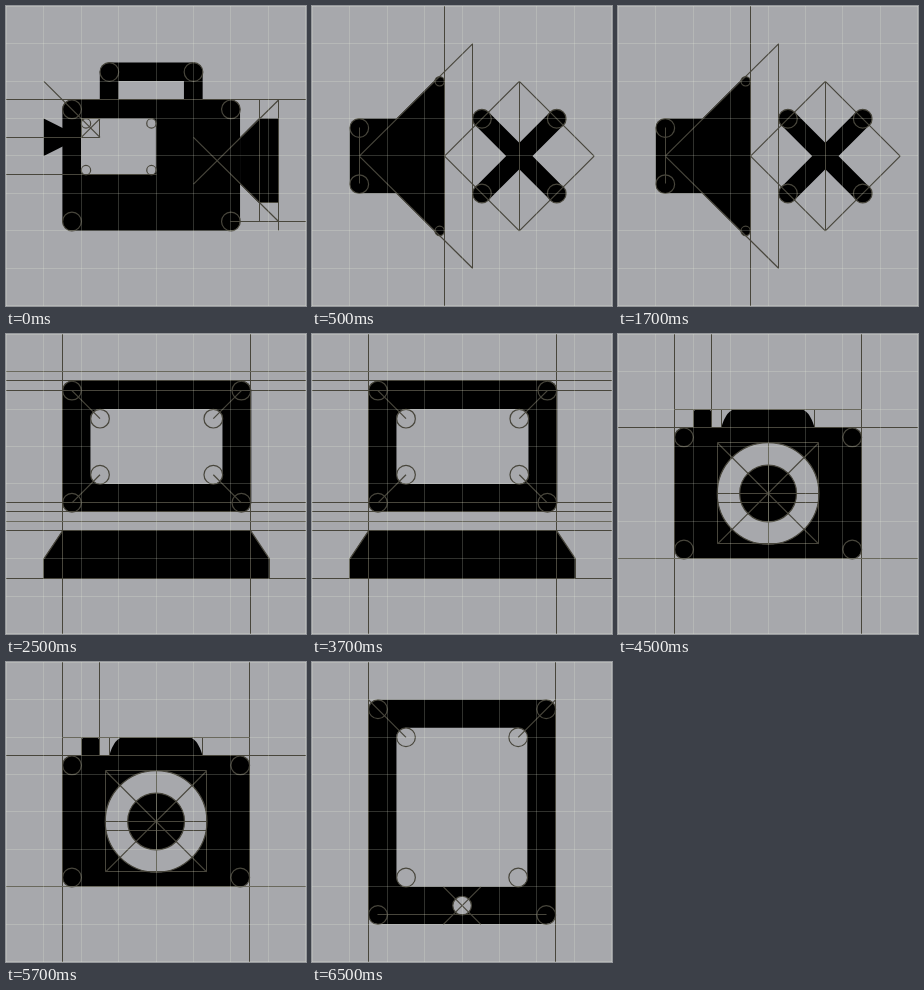
These frames come from a looping animation (300x300 px, 8000 ms). An HTML page with a canvas:

```html
<!DOCTYPE html>
<html lang="en">
<head>
<meta charset="utf-8">
<title>Icon construction</title>
<style>
html, body { margin: 0; width: 100%; height: 100%; overflow: hidden; background: #a7a8ac; }
canvas { display: block; width: 300px; height: 300px; }
</style>
</head>
<body>
<canvas id="stage" width="300" height="300"></canvas>
<script>
const ctx = document.getElementById('stage').getContext('2d');
const SIZE = 300, LOOP = 8000, HOLD = 2000, LEAD = 500;
const U = 18.7;    // half a grid cell; all shapes are given in this unit
const END = 17;    // just past the stage edge
const R = 0.5;     // common corner radius
const PAPER = '#a7a8ac', INK = '#000', GUIDE = '#48463c', GRID = 'rgba(240,242,222,0.2)';

const snapX = n => Math.floor(n * U + 0.45) + 0.5;
const snapY = n => Math.floor(n * U + 0.24) + 0.5;
const at = n => n * U + 0.5;
const edge = n => n * U + 0.3;

// Filled shapes
function box(x1, y1, x2, y2, radii = R, color = INK) {
  ctx.fillStyle = color;
  ctx.beginPath();
  ctx.roundRect(edge(x1), edge(y1), (x2 - x1) * U, (y2 - y1) * U, [radii].flat().map(r => r * U));
  ctx.fill();
}
function poly(...points) {
  ctx.fillStyle = INK;
  ctx.beginPath();
  points.forEach(([x, y]) => ctx.lineTo(edge(x), edge(y)));
  ctx.fill();
}
function disc(x, y, r, color = INK) {
  ctx.fillStyle = color;
  ctx.beginPath();
  ctx.arc(at(x), at(y), r * U, 0, Math.PI * 2);
  ctx.fill();
}

// Guides: straight ones sit on whole pixels
function line(x1, y1, x2, y2) {
  const slanted = x1 !== x2 && y1 !== y2;
  const [px, py] = slanted ? [at, at] : [snapX, snapY];
  ctx.lineWidth = slanted ? 1.2 : 1;
  ctx.beginPath();
  ctx.moveTo(px(x1), py(y1));
  ctx.lineTo(px(x2), py(y2));
  ctx.stroke();
}
const across = (...ys) => ys.forEach(y => line(-1, y, END, y));
const down = (...xs) => xs.forEach(x => line(x, -1, x, END));
const outline = (...points) => points.forEach((p, i) => line(...p, ...points[(i + 1) % points.length]));
function ring(x, y, r = R) {
  ctx.lineWidth = 1.2;
  ctx.beginPath();
  ctx.arc(at(x), at(y), r * U, 0, Math.PI * 2);
  ctx.stroke();
}
// Circles that touch the corners of a box from inside
function corners(x1, y1, x2, y2, r = R) {
  for (const x of [x1 + r, x2 - r]) for (const y of [y1 + r, y2 - r]) ring(x, y, r);
}
function cross(x, y, r) {
  line(x - r, y - r, x + r, y + r);
  line(x - r, y + r, x + r, y - r);
}
const square = (x, y, r) => outline([x - r, y - r], [x + r, y - r], [x + r, y + r], [x - r, y + r]);
const diamond = (x, y, r) => outline([x, y - r], [x + r, y], [x, y + r], [x - r, y]);

const videoCamera = {
  shape() {
    box(5, 3, 10.5, 5.5, [R, R, 0, 0]);
    box(6, 4, 9.5, 5, 0, PAPER);
    box(3, 5, 12.5, 12);
    box(4, 6, 8, 9, 0.25, PAPER);
    poly([2, 6], [4, 7], [2, 8]);
    poly([12.5, 7], [13.5, 6], [14.55, 6], [14.55, 10.5], [13.5, 10.5], [12.5, 9.5]);
  },
  guides() {
    across(5);
    line(-1, 7, 4, 7);
    line(-1, 9, 8, 9);
    line(12, 11.5, END, 11.5);
    line(10, 9.5, 14.55, 5);
    line(10, 7, 14.55, 11.5);
    line(13.55, 5, 13.55, 11.5);
    line(14.55, 5, 14.55, 12);
    line(13.55, 10.5, 14.55, 10.5);
    line(2, 4, 4, 6);
    square(4.5, 6.5, 0.5);
    cross(4.5, 6.5, 0.5);
    corners(3, 5, 12.5, 12);
    corners(4, 6, 8, 9, 0.25);
    ring(5.5, 3.5);
    ring(10, 3.5);
  }
};

const mutedSpeaker = {
  x: 11.06, wall: 7.06,
  shape() {
    box(2, 6, 5, 10, [R, 0, 0, R]);
    poly([2.5, 8], [6.6, 3.9], [this.wall, 4], [this.wall, 12], [6.6, 12.1]);
    for (const y of [4, 12]) disc(6.8, y, 0.25);
    // Two bars with round ends
    for (const turn of [1, -1]) {
      ctx.save();
      ctx.translate(at(this.x), at(8));
      ctx.rotate(turn * Math.PI / 4);
      const half = (2 * Math.SQRT2 + R) * U;
      ctx.beginPath();
      ctx.roundRect(-half, -R * U, half * 2, U, R * U);
      ctx.fill();
      ctx.restore();
    }
  },
  guides() {
    down(this.wall);
    outline([2.5, 8], [8.56, 2], [8.56, 14]);
    line(2.5, 6.5, 2.5, 9.5);
    diamond(this.x, 8, 4);
    line(this.x, 4, this.x, 12);
    for (const y of [6.5, 9.5]) ring(2.5, y);
    for (const y of [4, 12]) ring(6.8, y, 0.25);
    corners(this.x - 2.5, 5.5, this.x + 2.5, 10.5);
  }
};

const laptop = {
  left: 3, right: 13.06,
  shape() {
    box(this.left, 2.5, this.right + 0.04, 9.5);
    box(4.5, 4, 11.56, 8, R, PAPER);
    poly(...this.base());
  },
  base() {
    return [[this.left, 10.5], [this.right, 10.5], [14.06, 12], [14.06, 13.05], [2, 13.05], [2, 12]];
  },
  guides() {
    across(2, 2.5, 3, 9, 9.5, 10, 10.5, 13.05);
    down(this.left, this.right);
    outline(...this.base());
    for (const [x, dx] of [[3.5, 1.5], [12.56, -1.5]]) {
      line(x, 3, x + dx, 4.5);
      line(x, 9, x + dx, 7.5);
    }
    corners(this.left, 2.5, this.right, 9.5);
    corners(4.5, 4, 11.56, 8);
  }
};

const photoCamera = {
  shape() {
    box(3, 5, 13, 12);
    box(4, 4, 5, 5.5, [0.25, 0.25, 0, 0]);
    ctx.beginPath();
    ctx.moveTo(edge(5.5), edge(5));
    ctx.quadraticCurveTo(edge(5.8), edge(4), edge(6.3), edge(4));
    ctx.lineTo(edge(9.7), edge(4));
    ctx.quadraticCurveTo(edge(10.2), edge(4), edge(10.5), edge(5));
    ctx.fill();
    disc(8, 8.5, 2.72, PAPER);
    disc(8, 8.5, 1.52);
  },
  guides() {
    down(3, 13);
    across(5, 12);
    line(5, -1, 5, 5);
    line(3, 4, 13, 4);
    for (const x of [4, 5.5, 10.5]) line(x, 4, x, 5);
    const r = 2.7;
    square(8, 8.5, r);
    cross(8, 8.5, r);
    line(8, 8.5 - r, 8, 8.5 + r);
    for (const y of [8.5, 9]) line(8 - r, y, 8 + r, y);
    ring(8, 8.5, 2.72);
    ring(8, 8.5, 1.52);
    corners(3, 5, 13, 12);
  }
};

const tablet = {
  shape() {
    box(3, 2, 13, 14);
    box(4.5, 3.5, 11.5, 12, R, PAPER);
    disc(8, 13, R, PAPER);
  },
  guides() {
    down(3, 13);
    line(3, 2, 5, 4);
    line(13, 2, 11, 4);
    line(3.5, 13.5, 12.5, 13.5);
    cross(8, 13, 1);
    ring(8, 13);
    corners(3, 2, 13, 14);
    corners(4.5, 3.5, 11.5, 12);
  }
};

const scenes = [videoCamera, mutedSpeaker, laptop, photoCamera, tablet];

function drawGrid() {
  ctx.fillStyle = GRID;
  for (let n = 0; n < END; n += 2) {
    ctx.fillRect(snapX(n) - 0.5, 0, 1, SIZE);
    ctx.fillRect(0, snapY(n) - 0.5, SIZE, 1);
  }
}

function draw(time) {
  const t = time % LOOP;
  const scene = scenes[Math.floor((t + HOLD - LEAD) / HOLD)];
  ctx.fillStyle = PAPER;
  ctx.fillRect(0, 0, SIZE, SIZE);
  ctx.fillStyle = INK;
  scene.shape();
  ctx.strokeStyle = GUIDE;
  scene.guides();
  drawGrid();
}

const origin = performance.now();
function tick() {
  draw(performance.now() - origin);
  requestAnimationFrame(tick);
}
tick();
</script>
</body>
</html>
```
